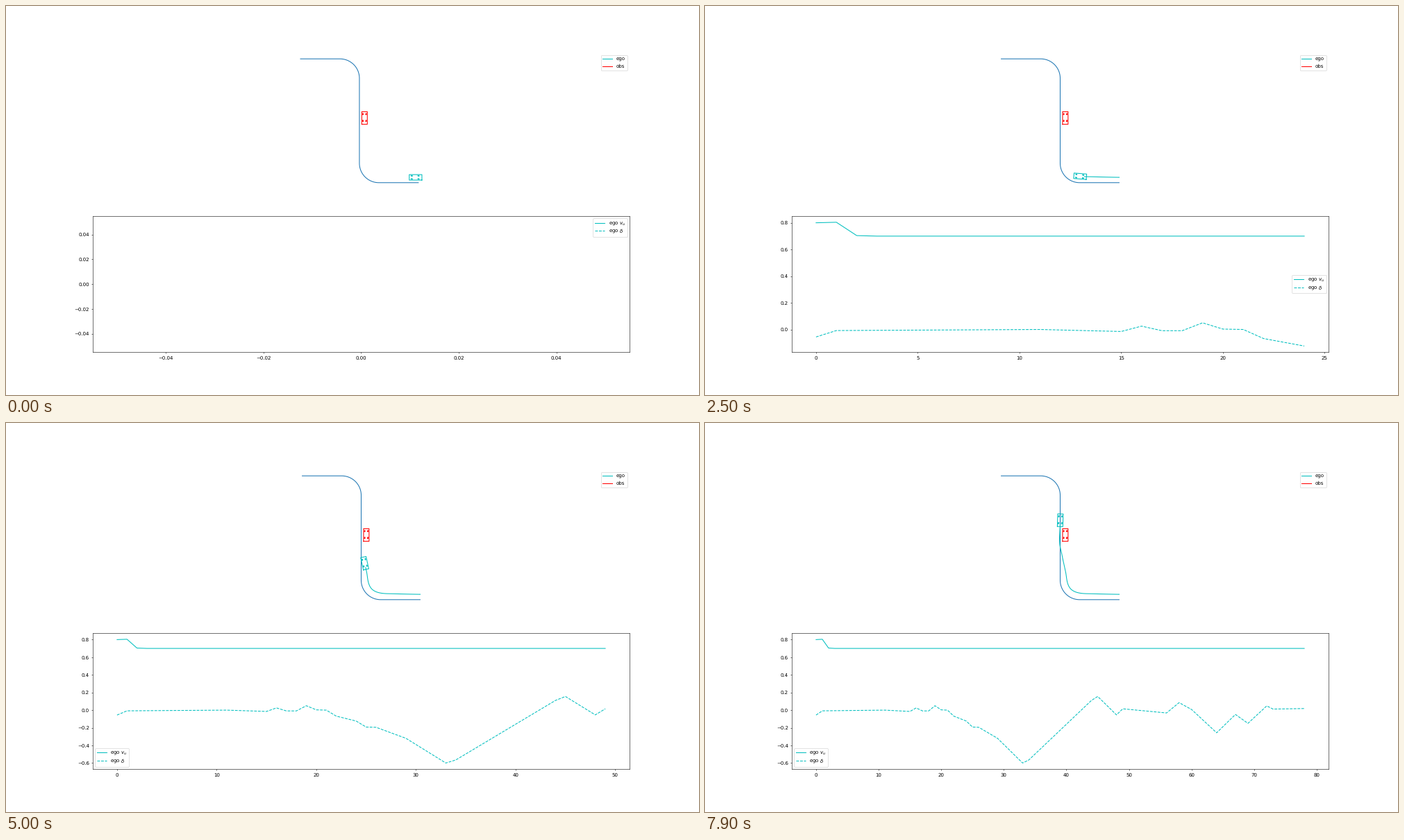
These frames come from a looping animation (998x561 px, 8 s). A matplotlib script:

```python
import numpy as np
import matplotlib.pyplot as plt
from matplotlib.animation import FuncAnimation

plt.rcParams["text.hinting"] = "none"

W, H, DPI = 998, 561, 50
FRAMES, INTERVAL = 80, 100
EGO, OBS, ROAD = "c", "r", "C0"

# Car dimensions, measured from the rear axle (px)
FRONT, REAR, HALF_W = 13.2, -5.0, 3.95
AXLE, TRACK, WHEEL = 9.8, 2.3, (0.8, 0.4)

STEP = 2.16 / 0.7   # px travelled per unit of speed and tick
TURN = 0.217        # heading gain per tick

# Key points (tick, value), joined by straight ramps
SPEED_KEYS = [(0, 0.8), (1, 0.804), (2, 0.704), (3, 0.7)]
STEER_KEYS = [
    (0, -0.056), (1, -0.008), (11, 0), (15, -0.015), (16, 0.025),
    (17, -0.009), (18, -0.009), (19, 0.05), (20, 0.003), (21, 0),
    (22, -0.068), (24, -0.124), (25, -0.192), (26, -0.195), (29, -0.32),
    (33, -0.6), (34, -0.565), (44, 0.11), (45, 0.155), (48, -0.054),
    (49, 0.015), (56, -0.032), (58, 0.085), (60, 0.007), (64, -0.257),
    (67, -0.049), (69, -0.15), (72, 0.048), (73, 0.012), (78, 0.018)]

ticks = np.arange(FRAMES - 1)
speed = np.interp(ticks, *zip(*SPEED_KEYS))
steer = np.interp(ticks, *zip(*STEER_KEYS))


def drive(start):
    """Integrate the bicycle model; heading 0 points left, pi/2 points up."""
    head = np.concatenate([[0], np.cumsum(-np.tan(steer)) * TURN])
    mid = (head[1:] + head[:-1]) / 2
    dist = speed * STEP
    dist[0] = 0  # the car starts from rest
    steps = -dist[:, None] * np.column_stack([np.cos(mid), np.sin(mid)])
    pos = np.vstack([[0, 0], np.cumsum(steps, axis=0)]) + start
    return pos, head


def road():
    cx, half, r = 511.5, 84.9, 28
    top, bottom = 76.25, 254.78
    a = np.linspace(0, np.pi / 2, 40)
    x = np.concatenate([[cx - half], cx - r + r * np.sin(a),
                        cx + r - r * np.cos(a), [cx + half]])
    y = np.concatenate([[top], top + r - r * np.cos(a),
                        bottom - r + r * np.sin(a), [bottom]])
    return x, y


def box(x0, x1, y0, y1):
    return np.array([[x0, y0], [x1, y0], [x1, y1], [x0, y1], [x0, y0]])


def rotate(pts, h):
    c, s = np.cos(h), np.sin(h)
    return pts @ np.array([[-c, -s], [s, -c]])


def draw_car(ax, pos, h, delta, color):
    shapes = [box(REAR, FRONT, -HALF_W, HALF_W)]
    wl, ww = WHEEL
    for ahead, angle in ((0, 0), (AXLE, -delta)):
        wheel = -rotate(box(-wl, wl, -ww, ww), angle)
        shapes += [wheel + (ahead, side) for side in (-TRACK, TRACK)]
    for shape in shapes:
        ax.plot(*(rotate(shape, h) + pos).T, color=color, snap=False)


poses, heads = drive((596.5, 247.1))
road_x, road_y = road()
road_end = road_x[-1]

fig, (scene, chart) = plt.subplots(2, 1, figsize=(W / DPI, H / DPI), dpi=DPI)
area = scene.get_position()


def draw(k):
    scene.clear()
    chart.clear()

    # The view recentres while the car sticks out past the end of the road
    shift = max(0, poses[k, 0] - REAR - road_end) / 2
    scene.axis("off")
    scene.plot(road_x, road_y, color=ROAD)
    scene.plot(*poses[:k].T, color=EGO)
    draw_car(scene, poses[k], heads[k], steer[k - 1] if k else 0, EGO)
    draw_car(scene, np.array([518.9, 165.6]), np.pi / 2, 0, OBS)
    scene.set_xlim(area.x0 * W + shift, area.x1 * W + shift)
    scene.set_ylim((1 - area.y0) * H, (1 - area.y1) * H)
    keys = [plt.Line2D([], [], color=c) for c in (EGO, OBS)]
    scene.legend(keys, ["ego", "obs"], loc="upper right")

    chart.plot(ticks[:k], speed[:k], color=EGO, label="ego $v_u$")
    chart.plot(ticks[:k], steer[:k], "--", color=EGO, label=r"ego $\delta$")
    # Tighter rows offset the padding of math text at low resolution
    chart.legend(loc="best", labelspacing=0.15)
    return []


anim = FuncAnimation(fig, draw, frames=FRAMES, interval=INTERVAL,
                     init_func=lambda: draw(0), repeat=True, repeat_delay=0)
plt.show()
```
